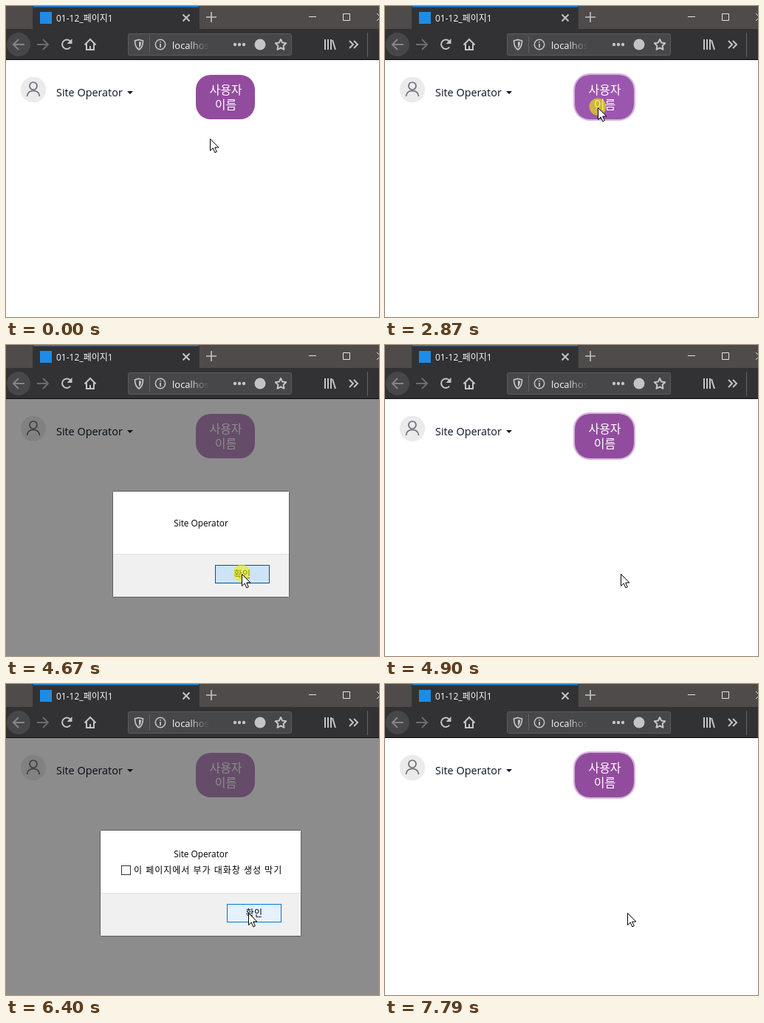
Animation of 505 by 420 pixels, one loop 8340 ms. Source, as an HTML page:

```html
<!DOCTYPE html>
<html lang="ko">
<head>
<meta charset="utf-8">
<title>Page dialog demo</title>
<style>
  html, body { margin: 0; width: 100%; height: 100%; overflow: hidden; background: #fff; }
  svg { display: block; }
  text { font: 12px "Open Sans", "Noto Sans CJK KR", "Noto Sans CJK", sans-serif; white-space: pre; }
  .mid { text-anchor: middle; }
  .icon { fill: none; stroke: #c4c4c5; stroke-width: 2; }
  .thin { fill: none; stroke: #e4e3e3; }
</style>
</head>
<body>
<svg width="505" height="420" viewBox="0 0 505 420">
  <defs>
    <linearGradient id="fade" gradientUnits="userSpaceOnUse" x1="246" x2="275" y1="0" y2="0">
      <stop stop-color="#f9f9fa"/><stop offset="1" stop-color="#f9f9fa" stop-opacity="0"/>
    </linearGradient>
  </defs>

  <!-- tab strip -->
  <rect width="505" height="31" fill="#4f4b4a"/>
  <rect y="31" width="505" height="41" fill="#323234"/>
  <rect y="72" width="505" height="1" fill="#0c0c0d"/>
  <rect x="36" width="226" height="31" fill="#3a3737"/>
  <rect x="37" width="224" height="32" fill="#323234"/>
  <rect x="37" width="224" height="1.5" fill="#1584e4"/>
  <rect x="46" y="8" width="16" height="16" fill="#1e8ce6"/>
  <text x="68" y="21" fill="#f9f9fa">01-12_페이지1</text>
  <path class="icon" stroke-width="1.6" d="M239.5 11.5l9 9m0-9l-9 9"/>
  <path class="icon" style="stroke-width:1.6" d="M271 15h14M278 8v14"/>
  <path class="thin" d="M410 14.5h10M456.5 10.5h9v9h-9zM502 10l10 10m0-10l-10 10"/>

  <!-- toolbar -->
  <circle cx="17" cy="52" r="16" fill="#474749"/>
  <path class="icon" style="stroke:#858586" d="M25 52H10m7-7l-7 7 7 7"/>
  <path class="icon" style="stroke:#6c6c6e" d="M42 52h15m-7-7l7 7-7 7"/>
  <path class="icon" d="M87.2 55.5a6.2 6.2 0 1 1-.6-8.2"/>
  <path d="M89.5 44v7h-7z" fill="#c4c4c5"/>
  <path class="icon" d="M106.5 52.500l7.500-7.500 7.500 7.500M109 51v8h10v-8M114 59v-5"/>
  <rect x="165.500" y="37.500" width="221" height="29" rx="2" fill="#474749" stroke="#5b5b5d"/>
  <path class="icon" style="stroke-width:1.700" d="M180 45.500l5.500 1.500c0 6-1.500 9.500-5.500 12-4-2.500-5.500-6-5.500-12z"/>
  <path d="M180 48l3 .8c0 4-.8 6-3 7.700z" fill="#c4c4c5"/>
  <path d="M194.500 41v22M489.500 36v33" stroke="#646466"/>
  <circle class="icon" style="stroke-width:1.500" cx="209" cy="52" r="6.700"/>
  <path class="icon" style="stroke-width:1.800" d="M209 51v5M209 48v1.500"/>
  <text x="225" y="58" fill="url(#fade)" style="font-size:13px">localhost</text>
  <g fill="#c4c4c5">
    <circle cx="310" cy="52" r="2.200"/><circle cx="316" cy="52" r="2.200"/><circle cx="322" cy="52" r="2.200"/>
    <circle cx="344" cy="52" r="7.500"/>
  </g>
  <path class="icon" stroke-linejoin="round" d="M372 45l2.200 4.600 5 .7-3.600 3.500.9 5-4.500-2.400-4.500 2.400.9-5-3.600-3.500 5-.7z"/>
  <path class="icon" d="M432 45v14M436 45v14M440 45v14M442 46l4 13"/>
  <path class="icon" d="M465 47l5 5-5 5m6-10l5 5-5 5"/>

  <!-- page -->
  <circle cx="37" cy="113" r="17.200" fill="#ebebeb"/>
  <g fill="none" stroke="#6c6c7a" stroke-width="1.700">
    <circle cx="37" cy="108" r="5"/><path d="M28.500 122c.5-5 4-7.500 8.500-7.500s8 2.500 8.500 7.500"/>
  </g>
  <text x="68" y="122" fill="#0a1326" style="font-size:14.400px">Site Operator</text>
  <path d="M164 115h8l-4 4z" fill="#0a1326"/>
  <rect id="ring" x="256" y="92" width="82" height="62" rx="21" fill="none" stroke="#d6b4dc" stroke-width="2"/>
  <g id="pageButton">
    <rect id="pageFace" x="257" y="93" width="80" height="60" rx="20"/>
    <g class="mid" fill="#fff">
      <text x="297.500" y="119" style="font-size:16px">사용자</text>
      <text x="297.500" y="138.500" style="font-size:16px">이름</text>
    </g>
  </g>

  <!-- alert -->
  <g id="alert">
    <rect y="73" width="505" height="347" fill="#000" opacity=".45"/>
    <rect id="frame" y="197.500" height="143" rx="1" fill="#fff" stroke="#5c5c5c"/>
    <rect id="footer" y="282" height="58" fill="#f0f0f0"/>
    <rect id="divider" y="282" height="1" fill="#dfdfdf"/>
    <text id="message" class="mid" x="264" style="font-size:11.800px">Site Operator</text>
    <g id="option">
      <rect id="box" x="156.500" y="245.500" width="12" height="12" fill="#fff"/>
      <text x="173" y="256" letter-spacing="1">이 페이지에서 부가 대화창 생성 막기</text>
    </g>
    <g id="ok">
      <rect id="okEdge" width="74" height="25"/>
      <rect id="okFace"/>
      <text class="mid" x="37" y="17" letter-spacing=".5">확인</text>
    </g>
  </g>

  <g id="pointer">
    <circle id="press" cy="-1" r="11.500" fill="#f2f000" opacity=".6"/>
    <path d="M.5 .5v16l3.700-3.600 2.600 6 2.500-1.100-2.600-5.800h5.200z" fill="#fff" stroke="#000"/>
  </g>
</svg>
<script>
const LOOP = 8340;
const $ = id => document.getElementById(id);
const set = (id, attrs) => {
  for (const name in attrs) $(id).setAttribute(name, attrs[name]);
};
const show = (id, on) => set(id, { visibility: on ? 'inherit' : 'hidden' });
const within = (t, from, to) => t >= from && t < to;
const ease = u => u * u * u * (u * (6 * u - 15) + 10);

// The pointer is sampled at a few moments: start, last sample, count, target x, y.
const moves = [
  [1790, 1790, 1, 278, 177],
  [1860, 2090, 4, 288, 137],
  [4110, 4350, 4, 319, 309],
  [4980, 5290, 5, 292, 146],
  [6090, 6400, 5, 328, 309],
];

function pointerAt(t) {
  let x = 276, y = 179;
  for (const [start, end, count, toX, toY] of moves) {
    if (t < start) break;
    const step = t >= end ? count : 1 + Math.floor((t - start) / (end - start) * (count - 1));
    const k = ease(step / count);
    x += (toX - x) * k;
    y += (toY - y) * k;
  }
  return [Math.round(x), Math.round(y)];
}

function layoutAlert(second, y, pressed) {
  const left = second ? 128 : 145, width = second ? 271 : 238;
  set('frame', { x: left - .5, width: width + 1 });
  set('footer', { x: left, width });
  set('divider', { x: left, width });
  set('message', { y: second ? 234 : 245 });
  show('option', second);
  set('box', { stroke: within(y, 243, 261) ? '#0078d7' : '#333' });

  const hover = within(y, 297, 322), inset = hover ? 1 : 2;
  set('ok', { transform: `translate(${second ? 299 : 283} 297)` });
  set('okEdge', { fill: pressed ? '#005499' : '#0078d7' });
  set('okFace', {
    x: inset, y: inset, width: 74 - 2 * inset, height: 25 - 2 * inset,
    fill: pressed ? '#cce4f7' : hover ? '#e5f1fb' : '#e1e1e1',
  });
}

function draw(t) {
  const [x, y] = pointerAt(t);
  const first = within(t, 3020, 4900), second = within(t, 5850, 7710);
  const open = first || second;
  const pressed = within(t, 2870, 2950) || within(t, 4670, 4820) ||
    within(t, 5530, 5690) || within(t, 7560, 7710);
  const hover = !open && within(x, 257, 337) && within(y, 93, 153);

  set('pointer', { transform: `translate(${x} ${y})` });
  show('press', pressed);
  set('pageFace', { fill: hover ? '#9b57ad' : '#924c9e' });
  set('pageButton', { opacity: open ? .65 : 1 });
  show('ring', within(t, 2870, 3100) || within(t, 4900, 5850) || t >= 7710);
  show('alert', open);
  layoutAlert(second, y, pressed);
}

function tick() {
  draw(performance.now() % LOOP);
  requestAnimationFrame(tick);
}
tick();
</script>
</body>
</html>
```
